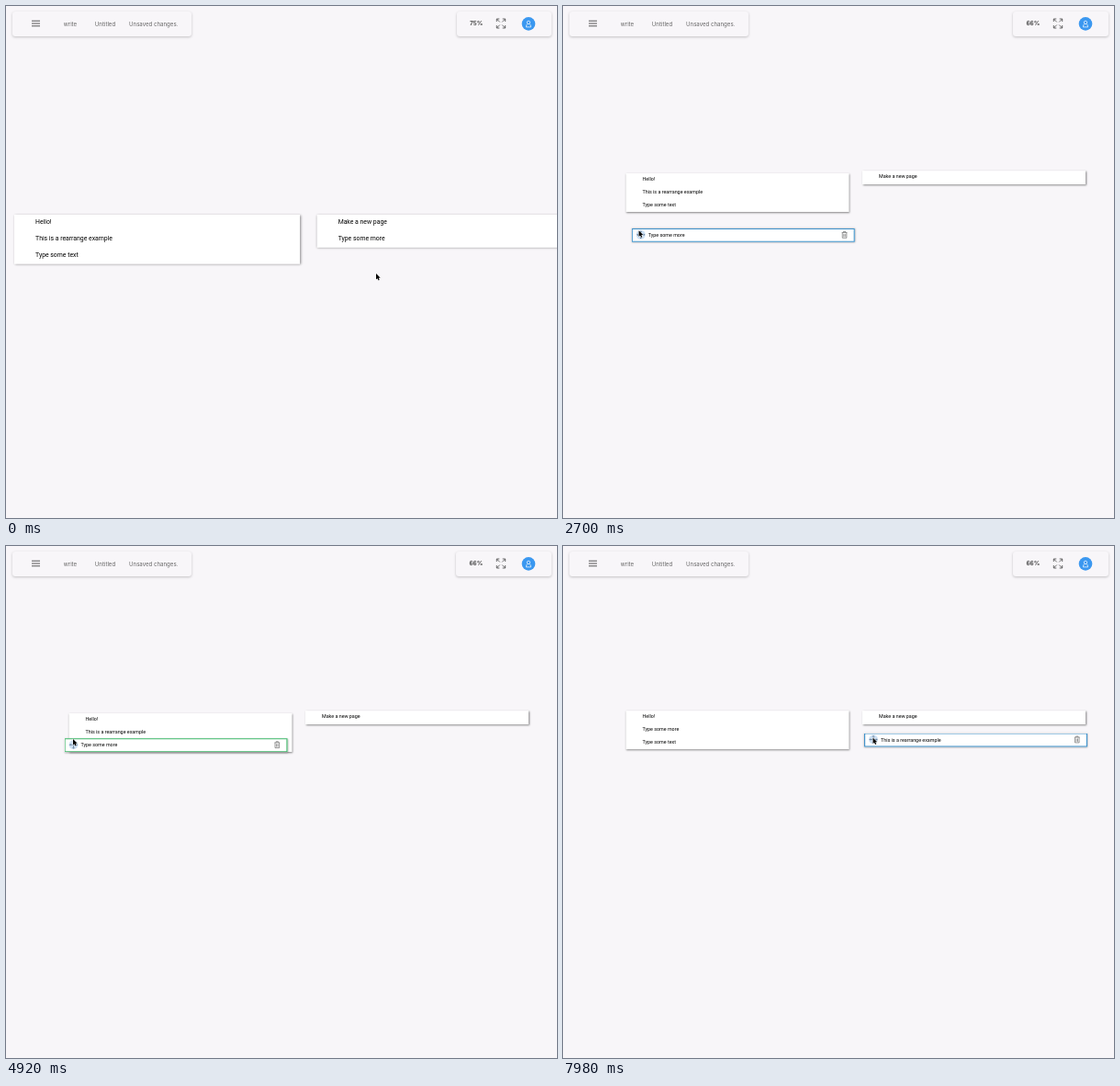
Recreate the animation shown at these times as an HTML page. Size 600 by 557 pixels, loop 8000 ms.

```html
<!DOCTYPE html>
<html lang="en">
<head>
<meta charset="utf-8">
<title>Rearranging pages</title>
<style>
  html, body { margin: 0; width: 100%; height: 100%; overflow: hidden; background: #f8f6f9; }
  #stage { position: relative; width: 600px; height: 557px; overflow: hidden; }
  .bar {
    position: absolute; top: 6px; height: 27px; box-sizing: border-box;
    border-radius: 3px; background: #f8f6f9; box-shadow: 0 1px 3px rgba(0, 0, 0, .22);
    font: 6.1px/27px Inter, sans-serif; color: #666; white-space: nowrap;
  }
  .bar span { position: absolute; top: 0; }
  #menu { left: 7px; width: 195px; }
  #tools { right: 6px; padding: 0 74.7px 0 14px; font-size: 6.6px; font-weight: 500; color: #222; }
  #icons, #cursor { position: absolute; left: 0; top: 0; }
  #cursor { overflow: visible; }
  #world { position: absolute; left: 0; top: 0; transform-origin: 0 0; }
  .page, .row { position: absolute; left: 0; top: 0; width: 243px; }
  .page { background: #fff; box-shadow: .5px .5px 2px rgba(0, 0, 0, .48); }
  .row {
    height: 15px; font: 5.37px/13px Roboto, sans-serif; color: #000;
    text-indent: 18px; white-space: nowrap;
  }
  .row svg { position: absolute; top: 0; left: 0; display: none; }
  .row.active svg { display: block; }
  .row.dragged {
    background: #fff; z-index: 3; line-height: 14px;
    box-shadow: inset 0 0 0 1.1px var(--edge), 0 .5px 2px rgba(0, 0, 0, .4);
  }
  #slot {
    position: absolute; left: 25.5px; top: 0; width: 192px; height: 2.2px;
    border-radius: 1px; background: #3cc759; z-index: 2;
  }
</style>
</head>
<body>
<div id="stage">
  <div id="world">
    <div class="page"></div>
    <div class="page"></div>
    <div id="slot"></div>
  </div>
  <div class="bar" id="menu">
    <span style="left:55.8px">write</span>
    <span style="left:89.8px">Untitled</span>
    <span style="left:127px">Unsaved changes.</span>
  </div>
  <div class="bar" id="tools">75%</div>
  <svg id="icons" width="600" height="40" fill="none">
    <path d="M28 16.2h9M28 19h9M28 21.8h9" stroke="#444" stroke-width=".9"/>
    <path d="M534.3 17v-3h3M540.7 14h3v3M543.7 21v3h-3M537.3 24h-3v-3M534.5 14.2l3.2 3.2M543.5 14.2l-3.2 3.2M543.5 23.8l-3.2-3.2M534.5 23.8l3.2-3.2" stroke="#444" stroke-width=".8"/>
    <circle cx="569" cy="19.4" r="7.3" fill="#3b98f0"/>
    <g stroke="#fff" stroke-width=".7">
      <circle cx="569" cy="17.9" r="1.7"/>
      <path d="M566.4 22.9q0-2.6 1.7-3.5M571.6 22.9q0-2.6-1.7-3.5M566.4 22.9h5.2"/>
    </g>
  </svg>
  <svg id="cursor" width="12" height="14">
    <path d="M0 0v6.6l1.5-1.3 1 2.2 1.2-.5-1-2.2h2z" stroke="#fff" paint-order="stroke"/>
  </svg>
</div>
<script>
const LOOP = 8000, STEP = 60;
const ROW = 13.85, PAGE_WIDTH = 243, PAGE_GAP = 257.5, LIFT = -2.9;
const HOME = { x: 68.5, y: 182 };
const GRAB = { x: 9.5, y: 5 };
const FIRST_PICK = 1740, FIRST_DROP = 5280, SECOND_PICK = 6180;

const texts = {
  hello: 'Hello!',
  example: 'This is a rearrange example',
  text: 'Type some text',
  make: 'Make a new page',
  more: 'Type some more'
};

// Turning points of the pointer: time, x, y
const path = [
  [0, 403, 291], [420, 366, 388], [840, 329, 307],
  [1680, 336, 199], [1860, 342, 226.5], [2130, 328, 279], [2520, 88, 252],
  [3360, 73.5, 226.5], [3720, 74, 238], [4110, 73, 219], [4500, 73, 233], [5040, 73, 203],
  [5460, 76, 188], [5700, 77, 247], [6060, 78, 214],
  [6500, 72.5, 238], [7560, 335, 253], [7920, 337.5, 208.5]
];

const lerp = (a, b, k) => a + (b - a) * k;

function progress(t, from, to) {
  const k = Math.min(1, Math.max(0, (t - from) / (to - from)));
  return k * k * (3 - 2 * k);
}

const chord = (i, axis) => (path[i + 1][axis] - path[i][axis]) / (path[i + 1][0] - path[i][0]);

// Slope at a point: flat where the direction turns, so the curve never overshoots.
function slope(i, axis) {
  if (i === 0 || i === path.length - 1) return 0;
  const before = chord(i - 1, axis), after = chord(i, axis);
  return before * after > 0 ? 2 * before * after / (before + after) : 0;
}

function pointerAt(t) {
  const next = path.findIndex(point => point[0] > t);
  if (next < 0) return path[path.length - 1].slice(1);
  const i = next - 1, span = path[next][0] - path[i][0];
  const k = (t - path[i][0]) / span, r = 1 - k;
  return [1, 2].map(axis =>
    lerp(path[i][axis], path[next][axis], k * k * (3 - 2 * k)) +
    span * k * r * (r * slope(i, axis) - k * slope(next, axis)));
}

// Zooming out first, then a short scroll.
function cameraAt(t) {
  const zoom = progress(t, 0, 660), scroll = progress(t, 780, 1020);
  return {
    x: lerp(9, HOME.x - 1, zoom) + scroll,
    y: lerp(227, HOME.y + 17, zoom) - 17 * scroll,
    scale: lerp(1.28, 1, zoom),
    percent: Math.round(lerp(75, 66, zoom))
  };
}

const world = document.getElementById('world');
const slot = document.getElementById('slot');
const tools = document.getElementById('tools');
const cursor = document.getElementById('cursor');
const pages = document.querySelectorAll('.page');
const rowIcons = `<svg width="243" height="14" fill="none">
  <circle cx="10" cy="7" r="5" fill="#cfe2f5"/>
  <path d="M10 3v8M6 7h8M9 4l1-1 1 1M9 10l1 1 1-1M7 6l-1 1 1 1M13 6l1 1-1 1" stroke="#46617c" stroke-width=".6"/>
  <path d="M228.9 4.6h5.8M230.7 4.4v-.9h2.2v.9M229.5 4.8v5.6h4.6V4.8M231.1 6v3.3M232.5 6v3.3" stroke="#555" stroke-width=".6"/>
</svg>`;

const rows = {};
for (const name in texts) {
  const row = rows[name] = document.createElement('div');
  row.className = 'row';
  row.innerHTML = texts[name] + rowIcons;
  world.append(row);
}

function layoutAt(t) {
  if (t < FIRST_PICK) return { lists: [['hello', 'example', 'text'], ['make', 'more']], lift: [0, 0] };
  if (t < FIRST_DROP) return { lists: [['hello', 'example', 'text'], ['make']], lift: [0, LIFT], dragged: 'more', since: FIRST_PICK };
  if (t < SECOND_PICK) return { lists: [['hello', 'more', 'example', 'text'], ['make']], lift: [0, LIFT] };
  return { lists: [['hello', 'more', 'text'], ['make']], lift: [LIFT, LIFT], dragged: 'example', since: SECOND_PICK };
}

const pageHeight = list => list.length * ROW + .7;

// The dragged row trails the pointer by one step.
function dragAt(t) {
  const [x, y] = pointerAt(t - STEP);
  return { x: x - GRAB.x - HOME.x, y: y - GRAB.y - HOME.y };
}

// The edge fades from green near a page to blue in free space.
function edgeColor(t, { lists, lift, since }) {
  const samples = 6;
  let free = 0;
  for (let i = 0; i < samples; i++) {
    const time = t - i * STEP;
    if (time < since) break;
    const pos = dragAt(time);
    const p = pos.x < PAGE_WIDTH ? 0 : 1;
    if (pos.y > lift[p] + pageHeight(lists[p]) + 8) free += 1 / samples;
  }
  const green = [60, 184, 104], blue = [62, 146, 204];
  return `rgb(${green.map((v, i) => Math.round(lerp(v, blue[i], free)))})`;
}

const place = (el, x, y) => { el.style.transform = `translate(${x}px, ${y}px)`; };

function render(t) {
  const camera = cameraAt(t), layout = layoutAt(t);
  const [px, py] = pointerAt(t);
  const localX = (px - camera.x) / camera.scale, localY = (py - camera.y) / camera.scale;

  world.style.transform = `translate(${camera.x}px, ${camera.y}px) scale(${camera.scale})`;
  tools.textContent = camera.percent + '%';
  place(cursor, px, py);

  layout.lists.forEach((list, p) => {
    const left = p * PAGE_GAP, top = layout.lift[p];
    pages[p].style.height = pageHeight(list) + 'px';
    place(pages[p], left, top);
    const over = !layout.dragged && localX > left && localX < left + PAGE_WIDTH;
    const hovered = over ? Math.floor((localY - top) / ROW) : -1;
    list.forEach((name, i) => {
      rows[name].className = i === hovered ? 'row active' : 'row';
      place(rows[name], left, top + i * ROW);
    });
  });

  let slotIndex = 0;
  if (layout.dragged) {
    const row = rows[layout.dragged], pos = dragAt(t);
    row.className = 'row active dragged';
    row.style.setProperty('--edge', edgeColor(t, layout));
    place(row, pos.x, pos.y);
    const offset = localY - layout.lift[0];
    if (localX < PAGE_WIDTH && offset < pageHeight(layout.lists[0])) slotIndex = Math.floor(offset / ROW);
  }
  slot.style.display = slotIndex > 0 ? 'block' : 'none';
  place(slot, 0, layout.lift[0] + slotIndex * ROW + .2);
}

const start = performance.now();
function tick() {
  const t = (performance.now() - start) % LOOP;
  render(Math.floor(t / STEP) * STEP);
  requestAnimationFrame(tick);
}
tick();
</script>
</body>
</html>
```
